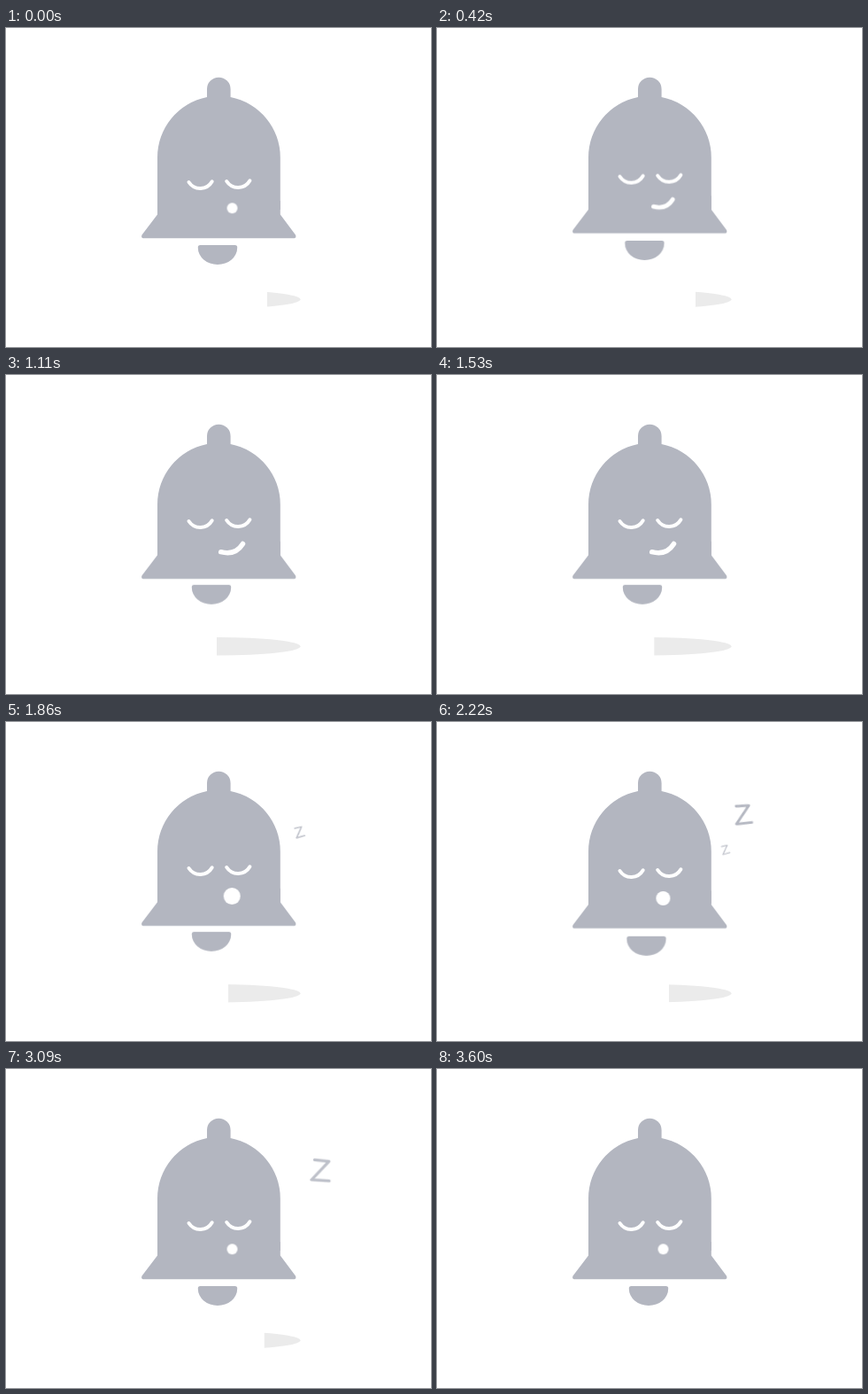
Write an HTML page without scripts that moves like this. It is 480 px wide and 360 px high and loops after 3630 ms.

```html
<!DOCTYPE html>
<html lang="en">
<head>
<meta charset="utf-8">
<title>Sleeping bell</title>
<style>
  html, body { margin: 0; width: 100%; height: 100%; overflow: hidden; background: #fff; }
  svg { display: block; width: 100vw; height: 100vh; }
  .bell { fill: #b3b6c0; }
  .line { fill: none; stroke: #fff; stroke-width: 4; stroke-linecap: round; }
  .smile { stroke-width: 5.5; }
  .z { fill: none; stroke: #b5b8c2; stroke-width: 3.6; stroke-linecap: round; stroke-linejoin: round; }

  .skirt, .clapper, .eyes, .mouth, .smile, .z, .wipe, .shadow {
    animation: 3630ms linear infinite;
  }
  .skirt { animation-name: skirt; }
  .clapper { animation-name: clapper; }
  .eyes { animation-name: eyes; }
  .mouth { animation-name: mouth; }
  .smile { animation-name: smile; }
  .z1 { animation-name: z1; }
  .z2 { animation-name: z2; }
  .wipe { animation-name: wipe; }
  .shadow { animation-name: shadow; }

  /* Breathing: rise, hold, sink, rest */
  @keyframes skirt {
    0%, 82%, 100% { transform: none; animation-timing-function: cubic-bezier(.4, 0, .7, .8); }
    11.6% { transform: translateY(-5.6px); animation-timing-function: ease-out; }
    21%, 51% { transform: translateY(-7.2px); animation-timing-function: ease-in; }
    61.2% { transform: translateY(-4.4px); }
    73.6% { transform: translateY(-.6px); animation-timing-function: ease-out; }
  }
  @keyframes clapper {
    0%, 82%, 100% { transform: none; animation-timing-function: cubic-bezier(.4, 0, .7, .8); }
    11.6% { transform: translate(-4.6px, -5px); animation-timing-function: ease-out; }
    21%, 51% { transform: translate(-7px, -8.2px); animation-timing-function: ease-in; }
    61.2% { transform: translate(-2.5px, -3.2px); animation-timing-function: ease-out; }
    73.6% { transform: translate(-.1px, -1px); }
  }
  @keyframes eyes {
    0%, 82%, 100% { transform: none; animation-timing-function: cubic-bezier(.4, 0, .7, .8); }
    11.6% { transform: translateY(-6.4px); animation-timing-function: ease-out; }
    21%, 51% { transform: translateY(-9px); animation-timing-function: ease-in; }
    61.2% { transform: translateY(-6px); }
    73.6% { transform: translateY(-1px); animation-timing-function: ease-out; }
  }
  @keyframes mouth {
    0%, 82%, 100% { transform: translate(255.5px, 203.3px) scale(.6); }
    5%, 45% { transform: translate(255px, 199px) scale(0); }
    48%, 51.2% { transform: translate(255.2px, 196.5px) scale(.95); }
    61.2% { transform: translate(255.4px, 199px) scale(.8); }
    73.6% { transform: translate(255.5px, 202.8px) scale(.61); }
  }
  @keyframes smile {
    0%, 5% { transform: translate(255.5px, 200px) scale(.3); opacity: 0; }
    5.1% { transform: translate(255.5px, 200px) scale(.3); opacity: 1; }
    11.6% { transform: translate(255.3px, 198.3px) scale(.88); }
    21%, 43% { transform: translate(255px, 196px); }
    45% { transform: translate(255px, 196px) scale(.4); opacity: 1; }
    45.1%, 100% { transform: translate(255px, 196px) scale(.3); opacity: 0; }
  }
  @keyframes z1 {
    0%, 44% { transform: translate(322px, 138px) rotate(-24deg) scale(.15); opacity: 0; }
    51.2% { transform: translate(331px, 124.3px) rotate(-18deg) scale(.43); opacity: .85; }
    61.2% { transform: translate(345.5px, 104px) rotate(-8deg) scale(.8); opacity: 1; }
    73.6% { transform: translate(362.5px, 79.5px) rotate(1deg); opacity: 1; }
    79% { opacity: .8; }
    84.3%, 100% { transform: translate(373.5px, 63.5px) rotate(6deg); opacity: 0; }
  }
  @keyframes z2 {
    0%, 55% { transform: translate(317px, 152px) rotate(-24deg) scale(.1); opacity: 0; }
    61.2% { transform: translate(325.5px, 144px) rotate(-17deg) scale(.36); opacity: .9; }
    73.6% { transform: translate(342px, 128px) rotate(-3deg) scale(.78); opacity: 1; }
    87% { opacity: .85; }
    93.4%, 100% { transform: translate(365px, 104px) rotate(5deg); opacity: 0; }
  }
  @keyframes wipe {
    0%, 90%, 100% { transform: translateX(55px); }
    11.6% { transform: translateX(52px); }
    15% { transform: translateX(28px); }
    22% { transform: translateX(-6px); }
    30.6% { transform: translateX(-2px); }
    51.2% { transform: translateX(11px); }
    61.2% { transform: translateX(22px); }
    73.6% { transform: translateX(44px); }
  }
  @keyframes shadow {
    0%, 99.1% { opacity: 1; }
    99.11%, 100% { opacity: 0; }
  }
</style>
</head>
<body>
<svg viewBox="0 0 480 360">
  <ellipse class="shadow" cx="240" cy="306.3" rx="92.5" ry="10.3" fill="#ebebeb"/>
  <rect class="wipe" x="40" y="290" width="200" height="32" fill="#fff"/>

  <g class="bell">
    <path d="M171 205V146A69.4 69.4 0 0 1 227 78V69A13.3 13.3 0 0 1 253.6 69V78A69.4 69.4 0 0 1 309.8 146V205Z"/>
    <path class="skirt" d="M171 195V210.5L153.5 233.5Q152 237.3 156 237.3H324.5Q328.5 237.3 327 233.5L309.8 210.5V195Z"/>
    <path class="clapper" d="M219.5 245H258.5Q261.5 245 261.2 248A22.2 19 0 0 1 216.8 248Q216.5 245 219.5 245Z"/>
  </g>

  <g class="line eyes">
    <path d="M206.5 174A15.4 15.4 0 0 0 232.7 173.3"/>
    <path d="M249.2 173A15.4 15.4 0 0 0 275.4 172.3"/>
  </g>
  <circle class="mouth" r="10" fill="#fff"/>
  <path class="line smile" d="M-12.3 3.7Q4 8 12.5 -5.5"/>

  <path class="z z1" d="M-8 -12.5L10 -11L-11 12.5L11 13.3"/>
  <path class="z z2" d="M-8 -12.5L10 -11L-11 12.5L11 13.3"/>
</svg>
</body>
</html>
```
